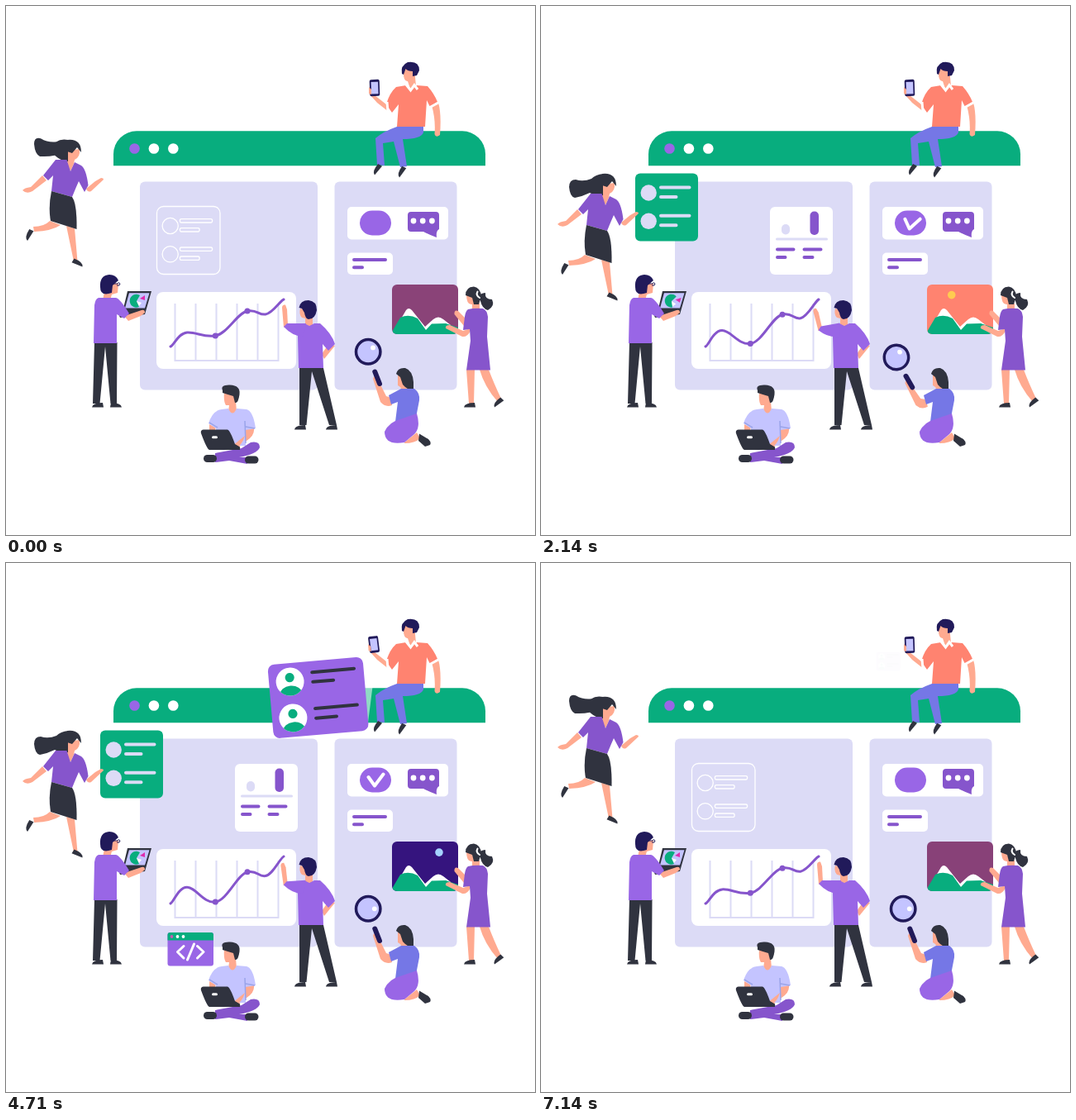
Write an HTML page that moves like this. It is 640 px wide and 640 px high and loops after 7.21 s.

```html
<!DOCTYPE html>
<html lang="en">
<head>
<meta charset="utf-8">
<title>Team building a page</title>
<style>
html,body{margin:0;width:100%;height:100%;overflow:hidden;background:#fff}
svg{display:block;width:100vw;height:100vh}
.lav{fill:#dcdbf6}.green{fill:#08ad7e}.pur{fill:#9966e6}.plum{fill:#8655cc}.dark{fill:#30333f}
.skin{fill:#ffaa90}.coral{fill:#ff8370}.blue{fill:#7577e6}.lilac{fill:#c4c4ff}.navy{fill:#211a5a}.white{fill:#fff}
.line{fill:none;stroke-linecap:round;stroke-linejoin:round;stroke-width:4}
.thin{stroke-width:2}.mid{stroke-width:3}.thick{stroke-width:6}
</style>
</head>
<body>
<svg viewBox="0 0 640 640">
<defs>
  <clipPath id="frame"><rect x="467" y="337" width="80" height="60" rx="6"/></clipPath>
  <clipPath id="wipe"><polygon id="wipeShape"/></clipPath>
  <clipPath id="round"><circle r="17"/></clipPath>
  <g id="avatar"><circle r="17" class="white"/><g class="green" clip-path="url(#round)"><circle cy="-5" r="5.600"/><ellipse cy="15" rx="13.500" ry="10"/></g></g>
  <path id="shoe" class="dark" d="M0 0Q1-5.500 13-5.500L14 0Z"/>
</defs>

<path class="green" d="M130 193.300v-14a28 28 0 0 1 28-28h394a28 28 0 0 1 28 28v14z"/>
<g id="buttons"></g>
<g class="lav"><rect x="162" y="212.500" width="215" height="252" rx="6"/><rect x="397.500" y="212.500" width="148" height="252" rx="6"/></g>

<g id="outline" fill="none" stroke="#fff" stroke-width="1.300">
  <path pathLength="1" d="M259 316a8 8 0 0 1-8 8.500h-60.500a8 8 0 0 1-8-8v-66a8 8 0 0 1 8-8H251a8 8 0 0 1 8 8z"/>
</g>

<g clip-path="url(#wipe)">
  <rect class="white" x="277" y="243" width="76" height="82" rx="6"/>
  <rect class="lav" x="291" y="264" width="10" height="12.500" rx="5"/><rect class="plum" x="325.500" y="248.500" width="10.500" height="28.500" rx="5"/>
  <path class="line mid" stroke="#dcdbf6" d="M285.500 282h60"/>
  <path class="line" stroke="#8655cc" d="M286 294.500h19.500m13 0h20M286 304h9.500m23 0h10"/>
</g>

<rect class="white" x="413" y="243" width="122" height="39.500" rx="5"/>
<rect class="pur" x="428" y="247.500" width="38" height="30" rx="15"/>
<path id="check" class="line" stroke="#fff" pathLength="1" d="M438.500 259l7.500 10.500 10.500-14"/>
<path class="plum" d="M490 249h30a4 4 0 0 1 4 4v17q-4 2-3 10-9-3-16-7h-15a4 4 0 0 1-4-4v-16a4 4 0 0 1 4-4z"/>
<g id="typing"></g>
<rect class="white" x="413" y="298.500" width="55" height="26.500" rx="5"/>
<path class="line" stroke="#8655cc" d="M421 307h38m-38 9.300h10"/>

<g clip-path="url(#frame)">
  <rect id="sky" x="467" y="337" width="80" height="60"/>
  <circle id="sun" r="4.800" fill="#ffcb50"/><circle id="moon" r="4.800" fill="#a5d3ff"/>
  <path class="white" d="M477 380L484 368Q487 364 491 368L507 388 517 379Q523 374 529 379L538 386V396H477Z"/>
  <path class="green" d="M467 394L477 377Q487 372 498 378L508 392 515 384.500 532 384 547 389V397H467Z"/>
</g>

<rect class="white" x="182" y="346" width="169" height="93" rx="8"/>
<path id="grid" class="thin" fill="none" stroke="#dcdbf6"/>
<path id="curve" class="line mid" stroke="#8655cc"/>
<g class="plum"><circle id="dotA" cx="253.300" r="3.500"/><circle id="dotB" cx="292" r="3.500"/></g>

<g id="code">
  <rect class="pur" x="195.500" y="447" width="55.500" height="40.500" rx="3"/><path class="green" d="M195.500 456.500V450a3 3 0 0 1 3-3H248a3 3 0 0 1 3 3v6.500z"/>
  <path class="line mid" stroke="#fff" d="M215 463.500l-7.500 7 7.500 7.500m12.500-17l-8 19m12-16.500l7.500 7-7.500 7.500"/>
</g>

<!-- contact card beamed from the phone -->
<g id="tilt"><g id="contact">
  <path class="white" fill-opacity=".55" d="M449 108L430 196V116Z"/>
  <rect class="pur" x="315.500" y="112.500" width="115.500" height="89.500" rx="8"/>
</g></g>

<!-- man sitting on the bar -->
<path class="skin" d="M515 120L523 117Q527 130 525 156 520 160 518.500 155 520 138 515 120ZM463 128L449 117 440 107V98L446 108 460 119ZM481 75H494L496 97 490 103 486 91Q480 92 481 75Z"/>
<path class="navy" d="M479 82Q477 72 486 68 500 66 500 78L497 84 492 85 492 79Q486 79 483.500 76L481 83Z"/>
<path class="coral" d="M472 98L484 96 490 103 497 96 510 97Q518 106 522 116L513 122 509 114 507 146H473L475 119 467 129 460 119Q464 105 472 98Z"/>
<path class="mid" fill="none" stroke="#fff" d="M484 95l5.500 7 4.500-6.500 4 5.500M461 116l1 12M512 123l11-6"/>
<path class="blue" d="M473 146H505V153Q502 161 480 161L485 194 477 195 469 164 456 166 458 193 449 192 447 160Q456 152 473 146Z"/>
<use href="#shoe" transform="translate(446 204.500) rotate(-50)"/><use href="#shoe" transform="translate(476 207.500) rotate(-54)"/>
<g id="phone"><g transform="rotate(-2 446 99)"><rect class="navy" x="440" y="89" width="12" height="20" rx="2"/><rect class="lilac" x="441.800" y="91.800" width="8.500" height="14.500"/></g><path class="skin" d="M439 98l3 3v6l-3-1z"/></g>

<!-- flying girl -->
<g id="girl">
  <path class="skin" d="M53 301L66 306Q56 313 34 314L33 308Q46 308 53 301ZM73 307L83 310 86.500 350H82ZM44 246L49 252 32 265Q25 269 20 264 22 261 30 260Z"/>
  <use href="#shoe" transform="translate(26 325) rotate(-58)"/><use href="#shoe" transform="translate(92.500 356.500) scale(-1 1) rotate(-22)"/>
  <g id="reach">
    <g id="list"><rect class="green" x="114" y="202.500" width="76" height="82" rx="6"/></g>
    <path class="skin" d="M97 262L108 253 115 249Q118 249 118 251L103 265Q99 267 97 262Z"/>
  </g>
  <path class="skin" d="M73 216L89 214Q90 224 83 227L82 232 78 241 73 230Z"/>
  <path id="hair" class="dark" d="M61 209Q51 213 42 210 34 210 34 219 35 231 41 232 51 230 59 226 67 231 75 229V203Q66 204 61 209Z"/>
  <path class="dark" d="M74 203Q91 201 91 218L86 212 80 219 74 217Z"/>
  <path class="plum" d="M60 227H73.500L78 241 83 230 91 234Q97 238 99.500 258L95 266 88 253Q84 262 80 272L55 265 57 246 51 252 45 246Z"/>
  <path class="dark" d="M55 265L80 272Q86 280 85.500 311L54 301Q51 284 55 265Z"/>
</g>

<!-- man presenting a laptop -->
<path class="skin" d="M127 335L136 336 135 347 128 349 126 356H117L119 346Z"/>
<path class="navy" d="M114 340Q113 326 125 325 133 325 136 332L129 338 128 347Q114 352 114 340Z"/>
<path fill="none" stroke="#211a5a" d="M129 336h6q1-3 3 0 0 3-4 2"/>
<path class="dark" d="M107 407H134.500L134 481H126.500L120 412 113.500 481H105ZM147 345H176L168 373 138 377 136 372 142 366Z"/>
<use href="#shoe" x="104" y="485.500"/><use href="#shoe" transform="translate(140 485.500) scale(-1 1)"/>
<path class="lilac" d="M149 347.300H173.500L168 365.500H144Z"/>
<g id="pie"><path class="green" d="M158 357l4-7a8 8 0 1 0-1 14z"/><path fill="#df2cae" d="M162 354l6-4v6z"/><path class="white" d="M158 357l6 2-3 4z"/></g>
<path class="skin" d="M143 375L164 368Q168 367 168 371L163 375 148 381Z"/>
<path class="pur" d="M112 353H133Q138 354 149 372L143 378 134 373V408H106L107 362Q108 354 112 353Z"/>

<!-- man at the chart -->
<path class="skin" d="M356 366L364 368 371 377V387H362V378L358 377Q354 373 356 366ZM391 408L398 411 385 427 382 421Z"/>
<path class="navy" d="M354.500 365Q356 356 366 356 376 357 376 368 374 379 366 379 362 378 361 371L358 366Z"/>
<path class="dark" d="M355 438H384L400 507H391L370 442 363.500 507H355Z"/>
<use href="#shoe" x="349" y="512.500"/><use href="#shoe" x="387" y="512.500"/>
<path class="pur" d="M354 386L361 384 367 387 373 384H380Q394 396 398 409L390 417 383 409 384 438H354L353 400Z"/>
<g id="pointer"><path class="skin" d="M336 389L334 365Q334 361 338 361.500L340 367 341 386Z"/><path class="pur" d="M336 388L340 384H363L360 400Q347 400 336 388Z"/></g>

<!-- man with a laptop on the floor -->
<path class="skin" d="M264 468H277L279 490Q274 497 269 490L270 483H266Q263 478 264 468ZM246 506L254 510 252 515H246ZM289 511H300Q301 520 291 526L280 535 274 532 288 522Z"/>
<path class="dark" d="M262 465Q259 458 271 458.500 284 459 282.500 470 281 481 277 480L275 472Q268 470 262 468Z"/>
<path class="lilac" d="M261 488L269 487Q274 498 279 487L291 488Q299 490 302 511L290 513V532H256L254 511 245 505Q250 489 261 488Z"/>
<path fill="none" stroke="#9aa4ea" stroke-width="1.500" d="M246 504l10 6m33-8l1 27m0-20l11 2"/>
<path class="plum" d="M253 541L285 535 296 528Q307 526 307 534 304 542 282 546L292 546V554L270 550 253 552Z"/>
<path class="skin" d="M289 520Q286 531 278 535L274 532Z"/>
<g class="dark"><rect x="239" y="543" width="16" height="9" rx="4.500"/><rect x="289" y="544.500" width="16.500" height="9" rx="4.500"/><path d="M239 512.500H268Q271 513 277 530L283 533.500V537H246Q243 536 236 517 235 513 239 512.500Z"/></g>
<rect class="white" x="249" y="520.300" width="7" height="3" rx="1.500"/>

<!-- kneeling woman -->
<g id="glass">
  <circle class="lilac" cx="438.200" cy="418.300" r="14.700" stroke="#211a5a" stroke-width="3.500"/><circle id="glint" class="white" r="2.900"/>
  <path class="skin" d="M467 483Q459 486 453 479L444 451Q445 445 450 452L460 472 466 474Z"/>
  <path class="line thick" stroke="#211a5a" d="M446.300 442.500l5.700 14.500"/>
</g>
<path class="skin" d="M474 447H481L487 462Q480 467 477 461L474 459ZM482 528L497 516 501 523Q495 529 482 529Z"/>
<path class="dark" d="M472 445Q474 437 483 438 492 441 493 455V465Q486 465 480 458L477 449ZM500 517.500L511 524Q515 528 513 531L507 533 499 526Z"/>
<path class="blue" d="M478 463H494Q501 468 500 477L495 503H471L474 479 466 482 463 471Z"/>
<path class="pur" d="M471 502L497 493Q502 510 494 518L482 528Q458 532 458 515 462 506 471 502Z"/>

<!-- woman holding the picture -->
<path class="skin" d="M557 349H563L566 359 573 360V368H564V361Q557 362 557 349ZM557 379L547 369Q542 367 542.500 373L554 387ZM562 390L553 393 537 386Q531 386 532 390L552 400Q558 401 562 393ZM557 440H567L566 481H560ZM573 440H584Q590 456 599 475L595 479Q579 461 573 440Z"/>
<path class="dark" d="M556 350Q556 340 566 339.500 574 341 575 351L572 361H566L564 353ZM573 353Q573 347 580 347 579 355 588 355 592 363 583 368 576 366 574 357Z"/>
<use href="#shoe" x="554" y="485.500"/><use href="#shoe" transform="translate(591 485.500) rotate(-36)"/>
<path class="line thin" stroke="#fff" d="M570.500 345.500q-2.500 4.500 2.500 7.500"/>
<path class="plum" d="M559 367Q567 365 577 366 582 368 583 376L582 400 586 440.500H557L562 405 561 391 553 392 555 376Q556 369 559 367Z"/>
</svg>
<script>
const LOOP = 7210;
const $ = id => document.getElementById(id);
const set = (id, attrs) => Object.entries(attrs).forEach(([k, v]) => $(id).setAttribute(k, v));
const add = (id, markup) => $(id).insertAdjacentHTML('beforeend', markup);
const clamp = k => Math.min(1, Math.max(0, k));
const ramp = (t, from, to) => clamp((t - from) / (to - from));
const ease = (t, from, to) => { const k = ramp(t, from, to); return k * k * (3 - 2 * k); };
const mix = (a, b, k) => a + (b - a) * k;
// Rises over one span and falls over another.
const hold = (t, up, full, down, gone, f = ease) => f(t, up, full) - f(t, down, gone);
const zoom = (x, y, s) => `translate(${x} ${y}) scale(${s}) translate(${-x} ${-y})`;
const spin = (a, x, y) => `rotate(${a} ${x} ${y})`;

function buildRepeats() {
  for (let i = 0; i < 3; i++) {
    add('buttons', `<circle class="${i ? 'white' : 'pur'}" cx="${155.5 + 23.4 * i}" cy="172.500" r="6.300"/>`);
    add('typing', `<circle class="white" cx="${493 + 11.2 * i}" cy="260" r="3.400"/>`);
    add('code', `<circle class="white" cx="${200.5 + 7 * i}" cy="452" r="1.900" ${i ? '' : 'style="fill:#c558b2"'}/>`);
  }
  let grid = 'M204.500 429H330';
  for (let i = 0; i < 6; i++) grid += `M${204.5 + 25 * i} 360v70`;
  set('grid', { d: grid });

  for (let row = 0; row < 2; row++) {
    const y = 226 + 34.3 * row;
    add('list', `<circle class="lav" cx="130.200" cy="${y}" r="9.700"/>
      <path class="line" stroke="#dcdbf6" d="M145 ${y - 6.5}h34.500M145 ${y + 5}h18.500"/>`);
    add('outline', `<path pathLength="1" d="M208.300 ${y + 40}a9.600 9.600 0 1 1-19.200 0a9.600 9.600 0 1 1 19.200 0"/>`);
    for (const [dy, w] of [[36, 37], [47, 21.5]])
      add('outline', `<path pathLength="1" d="M${211 + w} ${y + dy}h-${w - 1}a1.500 2 0 0 1 0-4.300h${w - 1}a1.500 2 0 0 1 0 4.300z"/>`);
    const cy = 135 + 44 * row;
    add('contact', `<use href="#avatar" x="341" y="${cy}"/>
      <path class="line" stroke="#30333f" d="M368.500 ${cy - 9}h51m-51 11.700h25"/>`);
  }
}

const DAY = [255, 131, 112], NIGHT = [46, 16, 126], DUSK = .44;

function picture(t) {
  // Dusk to day, day to night, then a slow dawn back to dusk.
  const day = mix(DUSK, 1, ramp(t, 0, 850)) - ramp(t, 2250, 4450) + DUSK * ramp(t, 4500, LOOP);
  set('sky', { fill: `rgb(${NIGHT.map((n, i) => Math.round(mix(n, DAY[i], day)))})` });
  [['sun', 0], ['moon', LOOP / 2]].forEach(([id, start]) => {
    const local = t - start;
    const a = (100 - .061 * local) * Math.PI / 180;
    set(id, {
      cx: 510 + 26 * Math.sin(a), cy: 372 - 26 * Math.cos(a),
      opacity: hold(local, 250, 600, 2600, 2950)
    });
  });
}

// Smooth line through points, flatter than a plain spline.
function spline(pts) {
  const slope = i => {
    const a = pts[i - 1] || pts[i], b = pts[i + 1] || pts[i];
    return [(b[0] - a[0]) / 5, (b[1] - a[1]) / 12];
  };
  return pts.reduce((d, [x, y], i) => {
    if (!i) return `M${x} ${y}`;
    const [px, py] = pts[i - 1], [ax, ay] = slope(i - 1), [bx, by] = slope(i);
    return `${d}C${px + ax} ${py + ay} ${x - bx} ${y - by} ${x} ${y}`;
  }, '');
}

function chart(t) {
  const p = 1 - Math.abs(2 * t / LOOP - 1);
  const dip = 399 + 16 * p, crest = 369 + 7 * p;
  set('curve', { d: spline([[199, 412], [219, 395 - 4 * p], [253, dip], [292, crest], [314, 373 + 8 * p], [336, 355]]) });
  set('dotA', { cy: dip });
  set('dotB', { cy: crest });
  set('pointer', { transform: spin(-10 * hold(t, 1000, 2000, 3600, 5400), 360, 393) });
}

function girl(t) {
  set('girl', { transform: `translate(0 ${-41 * (1 - hold(t, 300, 1080, 5800, 7000))})` });
  const blow = 15 + 9 * ease(t, 300, 1000) - 24 * ease(t, 1070, 1900) + 15 * ease(t, 5900, 7000);
  set('hair', { transform: `translate(75 0) skewY(${blow}) translate(-75 0)` });
  set('reach', { transform: spin(5.3 * hold(t, 2250, 3500, 3500, 4650), 76, 276) });
  const show = hold(t, 1600, 2080, 5280, 5860, ramp);
  set('list', { transform: zoom(114, 250, mix(.56, 1, show)), opacity: show });
}

function page(t) {
  const drawn = 1 - hold(t, 60, 1150, 6300, 7080, ramp);
  set('outline', { 'stroke-dasharray': drawn < 1 ? `${drawn} 2` : 'none', opacity: drawn ? 1 : 0 });
  const right = 243 + 82 * hold(t, 650, 1000, 6350, 6850);
  const left = 243 + 82 * hold(t, 750, 1150, 6250, 6750);
  set('wipeShape', { points: `277,243 353,243 353,${right} 277,${left}` });
  const tick = hold(t, 600, 950, 6350, 6750);
  const sway = 11 * Math.cos(2 * Math.PI * (t - 2140) / 3430);
  set('check', { 'stroke-dasharray': `${tick} 2`, opacity: tick ? 1 : 0, transform: spin(sway, 446, 268) });
}

function tools(t) {
  const code = hold(t, 2440, 3000, 6100, 6650);
  set('code', { transform: zoom(252, 518, code), opacity: code });

  const tilt = spin(-5 * hold(t, 3050, 4700, 4700, 6350), 440.5, 109.5);
  set('tilt', { transform: tilt });
  set('phone', { transform: tilt });
  set('contact', {
    transform: zoom(436, 106, mix(.25, 1, hold(t, 2450, 3100, 6450, 7160))),
    opacity: hold(t, 2450, 2800, 6500, 7190)
  });

  const swing = -11 * ease(t, 150, 1070) + 6 * ease(t, 1070, 3400) + 5 * ease(t, 3600, 4550);
  set('glass', { transform: spin(swing, 480, 478) });
  const a = (-40 + 74 * ease(t, 150, 1070) - 83 * ease(t, 1070, 2140) - 311 * ease(t, 2140, 4700)) * Math.PI / 180;
  set('glint', { cx: 438.2 + 7.6 * Math.cos(a), cy: 418.3 + 7.6 * Math.sin(a) });
  set('pie', { transform: spin(30 * hold(t, 1200, 3000, 3600, 4710), 158, 357) });
}

function draw() {
  const t = performance.now() % LOOP;
  [picture, chart, girl, page, tools].forEach(part => part(t));
  requestAnimationFrame(draw);
}
buildRepeats();
draw();
</script>
</body>
</html>
```
